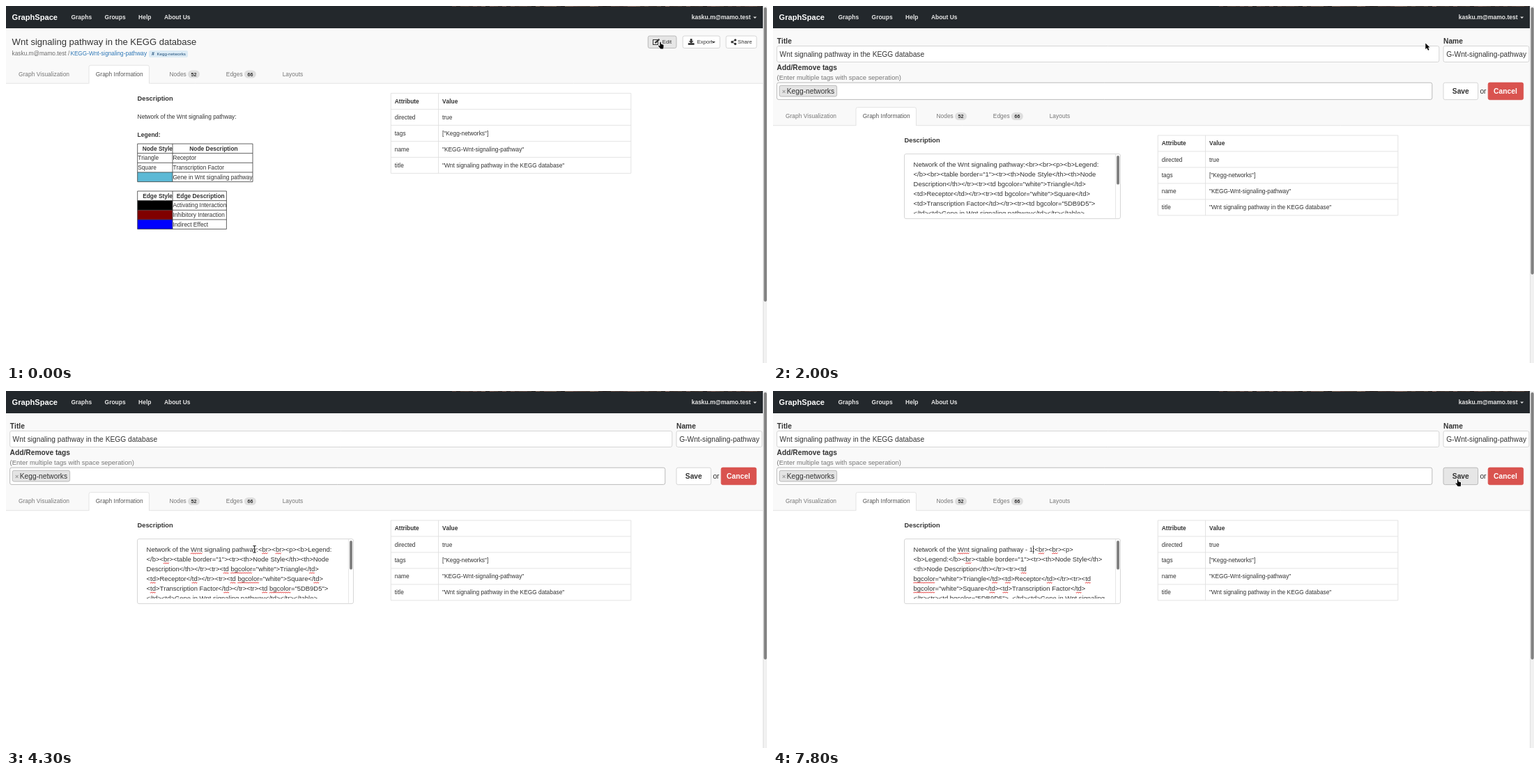
An HTML page with a canvas that plays this animation: 1092 px wide and 513 px high, repeating every 8000 ms.

```html
<!DOCTYPE html>
<html lang="en">
<head>
<meta charset="utf-8">
<title>Graph editor</title>
<style>
html, body { margin: 0; width: 100%; height: 100%; overflow: hidden; background: #fff; }
canvas { display: block; }
</style>
</head>
<body>
<canvas id="stage" width="1092" height="513"></canvas>
<script>
const ctx = document.getElementById('stage').getContext('2d');
const LOOP = 8000, STEP = 100;
const EDIT = 2000, FOCUS = 4300, TYPING = 5400, KEY = 200, TYPED = 6000, BLINK = 650;
const ZOOM = 8; // large font scaled down keeps letter advances exact
const SMALL = 8.38, AREA = 9.43, LARGE = 10.23;
const INK = '#333', GREY = '#777', LINE = '#ccc';

const USER = 'kasku.m@mamo.test';
const TITLE = 'Wnt signaling pathway in the KEGG database';
const HEAD = 'Network of the Wnt signaling pathway';
const SUFFIX = ' - 1';
const WRAP_SHORT = [
  ':<br><br><p><b>Legend:',
  '</b><br><table border="1"><tr><th>Node Style</th><th>Node',
  'Description</th></tr><tr><td bgcolor="white">Triangle</td>',
  '<td>Receptor</td></tr><tr><td bgcolor="white">Square</td>',
  '<td>Transcription Factor</td></tr><tr><td bgcolor="5DB9D5">',
  '</td><td>Gene in Wnt signaling pathway</td></tr></table>'
];
const WRAP_LONG = [
  ':<br><br><p>',
  '<b>Legend:</b><br><table border="1"><tr><th>Node Style</th>',
  '<th>Node Description</th></tr><tr><td',
  'bgcolor="white">Triangle</td><td>Receptor</td></tr><tr><td',
  'bgcolor="white">Square</td><td>Transcription Factor</td>',
  '</tr><tr><td bgcolor="5DB9D5">  </td><td>Gene in Wnt signaling'
];

// Pointer trips: each starts where the one before ended
const START = { x: 938.5, y: 51.8 };
const MOVES = [
  { from: 200, to: 600, x: 939.5, y: 66 },
  { from: 700, to: 1700, x: 936.3, y: 53.4 },
  { from: 2100, to: 2800, x: 467.5, y: 205 },
  { from: 2900, to: 3500, x: 308, y: 231 },
  { from: 3500, to: 4100, x: 356.6, y: 227.3 },
  { from: 6400, to: 6800, x: 757.5, y: 237 },
  { from: 7000, to: 7800, x: 982, y: 127.3 }
];

function setFont(size, bold) {
  ctx.font = `${bold ? 'bold ' : ''}${size * ZOOM}px "Liberation Sans", Arial, sans-serif`;
  ctx.fontKerning = 'none';
}

function widthOf(s, size, bold = false) {
  setFont(size, bold);
  return ctx.measureText(s).width / ZOOM;
}

// cy is the middle of the capitals
function text(s, x, cy, size = SMALL, color = INK, bold = false, align = 'left') {
  setFont(size, bold);
  ctx.textAlign = align;
  ctx.fillStyle = color;
  ctx.save();
  ctx.translate(x, cy + size * 0.344);
  ctx.scale(1 / ZOOM, 1 / ZOOM);
  ctx.fillText(s, 0, 0);
  ctx.restore();
}

function bold(s, x, cy, size = SMALL, color = INK, align = 'left') {
  text(s, x, cy, size, color, true, align);
}

function rect(x, y, w, h, color) {
  ctx.fillStyle = color;
  ctx.fillRect(x, y, w, h);
}

function box(x, y, w, h, fill, stroke, r = 2.4) {
  ctx.beginPath();
  ctx.roundRect(x, y, w, h, r);
  ctx.fillStyle = fill;
  ctx.fill();
  if (!stroke) return;
  ctx.strokeStyle = stroke;
  ctx.lineWidth = 0.8;
  ctx.stroke();
}

function line(x1, y1, x2, y2, color, width = 0.8) {
  ctx.beginPath();
  ctx.moveTo(x1, y1);
  ctx.lineTo(x2, y2);
  ctx.strokeStyle = color;
  ctx.lineWidth = width;
  ctx.stroke();
}

function downTriangle(x, y, w, color) {
  ctx.beginPath();
  ctx.moveTo(x, y);
  ctx.lineTo(x + w, y);
  ctx.lineTo(x + w / 2, y + w / 2);
  ctx.fillStyle = color;
  ctx.fill();
}

function grid(x, mid, right, top, rows, step, color) {
  for (const gx of [x, mid, right]) line(gx, top, gx, top + rows * step, color);
  for (let i = 0; i <= rows; i++) line(x, top + i * step, right, top + i * step, color);
}

function seeded(seed) {
  return () => (seed = seed * 16807 % 2147483647) / 2147483647;
}

function navBar() {
  rect(0, 0, 1086, 32, '#23282c');
  // sliver of a picture behind the window
  const rnd = seeded(11);
  for (let x = 640; x < 1080; x += 6) {
    rect(x, 0, 6, 1, `hsl(${10 + rnd() * 15} 18% ${15 + rnd() * 35}%)`);
  }
  bold('GraphSpace', 8.6, 16.6, 11.1, '#fff');
  let x = 93.5;
  for (const s of ['Graphs', 'Groups', 'Help', 'About Us']) {
    bold(s, x, 16.4, 8.45, '#e6e6e6');
    x += widthOf(s, 8.45, true) + 18.5;
  }
  bold(USER, 1068.5, 16.4, 8.5, '#e6e6e6', 'right');
  downTriangle(1072.2, 15.6, 5, '#e6e6e6');
}

function scrollBar(end) {
  rect(1086, 0, 6, 513, '#f1f1f1');
  rect(1086, 0, 0.7, 513, '#d8d8d8');
  box(1087.5, 2, 4.2, end - 2, '#808080', null, 2);
}

function tabs(base) {
  rect(0, 32, 1086, base - 32, '#f9f9f9');
  line(0, base, 1086, base, '#ddd');
  box(119, base - 26, 86.5, 30, '#fff', '#ddd');
  rect(118, base + 0.4, 89, 5, '#fff');
  const cy = base - 13.2;
  let x = 18;
  for (const s of ['Graph Visualization', 'Graph Information', 'Nodes 52', 'Edges 66', 'Layouts']) {
    const [label, count] = s.split(/ (?=\d)/);
    text(label, x, cy, 8.42, label.endsWith('Information') ? '#555' : GREY);
    x += widthOf(label, 8.42);
    if (count) {
      box(x + 2.2, cy - 5.6, 17, 11.2, '#dedede', null, 5.6);
      bold(count, x + 10.7, cy + 0.2, 7.1, INK, 'center');
      x += 19.2;
    }
    x += 37.8;
  }
}

function attributes(top) {
  const rows = { directed: 'true', tags: '["Kegg-networks"]',
    name: '"KEGG-Wnt-signaling-pathway"', title: `"${TITLE}"` };
  grid(552.3, 620.5, 896.8, top, 5, 23, '#ddd');
  bold('Attribute', 557.8, top + 11.4);
  bold('Value', 626, top + 11.4);
  Object.entries(rows).forEach(([key, value], i) => {
    const cy = top + 34.8 + i * 22.9;
    text(key, 557.8, cy, 8.35);
    text(value, 626, cy, 8.35);
  });
}

function legend(top, right, kind, rows) {
  const left = 188.7, mid = 239, step = 13.65;
  rows.forEach(([style, label], i) => {
    const y = top + step * (i + 1);
    if (style[0] === '#') rect(left, y, mid - left, step, style);
    else text(style, left + 0.5, y + step / 2, 8.25);
    text(label, mid + 0.4, y + step / 2, 8.28);
  });
  grid(left, mid, right, top, rows.length + 1, step, '#3a3a3a');
  bold(kind + ' Style', mid, top + 6.8, SMALL, INK, 'right');
  bold(kind + ' Description', (mid + right + 3) / 2, top + 6.8, SMALL, INK, 'center');
}

function editIcon(x, y) {
  ctx.strokeStyle = INK;
  ctx.lineWidth = 1;
  ctx.strokeRect(x - 4.5, y - 3.2, 7, 7);
  line(x - 1.5, y + 1.4, x + 4.5, y - 4, INK, 2.2);
}

function exportIcon(x, y) {
  rect(x - 1.4, y - 4.6, 2.8, 3.6, INK);
  downTriangle(x - 3.5, y - 1.4, 7, INK);
  rect(x - 4.4, y + 1.5, 8.8, 2.7, INK);
}

function shareIcon(x, y) {
  for (const [dx, dy] of [[2.3, -2.8], [-2.3, 0], [2.3, 2.8]]) {
    line(x - 2.3, y, x + dx, y + dy, INK, 1);
    ctx.beginPath();
    ctx.arc(x + dx, y + dy, 1.7, 0, 7);
    ctx.fillStyle = INK;
    ctx.fill();
  }
}

function button(x, y, w, h, hover) {
  box(x, y, w, h, hover ? '#e6e6e6' : '#fff', hover ? '#adadad' : LINE);
}

function toolButton(x, w, label, icon, hover) {
  button(x, 43, w, 17.5, hover);
  icon(x + 12 - (icon === shareIcon ? 1 : 0) - (icon === editIcon ? 0.3 : 0), 51.7);
  text(label, x + 20.5 - (icon === shareIcon ? 3.7 : 0), 51.8, 7.7);
}

function infoPage(hover) {
  tabs(111.2);
  text(TITLE, 8.6, 51.6, 13.05);
  text(USER + ' /', 8.6, 68.3, 8.3, '#6b6b6b');
  text('KEGG-Wnt-signaling-pathway', 92.4, 68.3, 8.22, '#2f78b7');
  box(205, 64, 56, 9.7, '#dcebf5', null, 2);
  bold('#', 208.9, 68.9, 7, '#1f4e79');
  text('Kegg-networks', 216.4, 68.9, 6.22, '#1f4e79');

  toolButton(921.3, 40.7, 'Edit', editIcon, hover);
  toolButton(971.2, 53.2, 'Export', exportIcon);
  toolButton(1033.2, 43.8, 'Share', shareIcon);
  downTriangle(1012.9, 51, 5, INK);

  bold('Description', 188.6, 132.7, 9.28);
  text(HEAD + ':', 188.6, 159.2, 8.35);
  bold('Legend:', 188.6, 185.2, 8.48);
  legend(198, 354, 'Node', [['Triangle', 'Receptor'], ['Square', 'Transcription Factor'],
    ['#5db9d5', 'Gene in Wnt signaling pathway']]);
  legend(266, 316.4, 'Edge', [['#000000', 'Activating Interaction'],
    ['#800000', 'Inhibitory Interaction'], ['#0000ff', 'Indirect Effect']]);
  attributes(125.4);
  scrollBar(424.8);
}

function wavy(x, w, y) {
  ctx.beginPath();
  for (let d = 0; d <= w; d += 0.5) ctx.lineTo(x + d, y + 0.7 * Math.sin(d * 2.2));
  ctx.strokeStyle = '#e01818';
  ctx.lineWidth = 0.9;
  ctx.stroke();
}

function textArea(t) {
  const left = 201.6;
  const keys = t < TYPING ? 0 : Math.floor((t - TYPING) / KEY) + 1;
  const start = HEAD + SUFFIX.slice(0, keys);
  const lines = [...(t < TYPED ? WRAP_SHORT : WRAP_LONG)];
  lines[0] = start + lines[0];

  box(188.5, 212.6, 310, 93, '#fff', LINE);
  line(491.6, 213.2, 491.6, 305.2, '#ddd');
  box(493.1, 215, 3.9, 41.6, '#808080', null, 2);

  ctx.save();
  ctx.beginPath();
  ctx.rect(189, 213, 302, 85.2);
  ctx.clip();
  lines.forEach((s, i) => {
    const cy = 227.9 + i * 14.05;
    text(s, left, cy, AREA);
    if (t < FOCUS) return;
    for (const m of s.matchAll(/\b(Wnt|br|td|bgcolor)\b/g)) {
      wavy(left + widthOf(s.slice(0, m.index), AREA), widthOf(m[0], AREA), cy + 5.4);
    }
  });
  ctx.restore();

  const since = t < TYPING ? t - FOCUS - STEP : Math.max(0, t - TYPED);
  const lit = since >= 0 && Math.floor(since / BLINK) % 2 === 0;
  if (lit) rect(left + widthOf(start, AREA), 222.3, 0.8, 11.4, '#111');
}

function editPage(t, hover) {
  tabs(171.7);
  bold('Title', 5.8, 50.2, LARGE);
  bold('Name', 962, 50.2, LARGE);
  box(5.6, 57.5, 950.2, 23, '#fff', LINE);
  box(962, 57.5, 122.8, 23, '#fff', LINE);
  text(TITLE, 9.6, 69.1, LARGE);
  text('G-Wnt-signaling-pathway', 1081, 69.1, LARGE, INK, false, 'right');
  bold('Add/Remove tags', 5.6, 88.5, LARGE);
  text('(Enter multiple tags with space seperation)', 5.6, 102.8, AREA, GREY);
  box(5.6, 110.2, 940.2, 24.2, '#fff', '#aaa');
  box(9.2, 114.2, 82.4, 15.8, '#e4e4e4', '#aaa');
  bold('×', 13.1, 122.6, 9, '#999');
  text('Kegg-networks', 19.8, 122.2, LARGE);
  button(962, 110.2, 49.6, 24.4, hover);
  bold('Save', 986.8, 122.4, 10.3, INK, 'center');
  text('or', 1014.4, 122, LARGE);
  box(1026.2, 110.1, 50.5, 24.6, '#d9534f', '#d9534f');
  bold('Cancel', 1051, 122.4, 10.3, '#fff', 'center');

  bold('Description', 188.6, 193.2, 9.28);
  textArea(t);
  attributes(185.9);
  scrollBar(385.8);
}

function outlined(path) {
  ctx.lineJoin = 'round';
  ctx.strokeStyle = '#fff';
  ctx.lineWidth = 1.2;
  ctx.stroke(path);
  ctx.fillStyle = '#000';
  ctx.fill(path);
}

const POINTERS = {
  arrow() {
    outlined(new Path2D('M0 0V8.6L2 6.8L3.7 10.4L5.2 9.7L3.6 6.2L6.2 6Z'));
  },
  hand() {
    outlined(new Path2D('M0 0H1.2L1.6 3L5 4V7L4.7 9.6H.7L-2.6 5.4L-2 4.8L-.2 6Z'));
  },
  beam() {
    for (const [color, width] of [['#fff', 1.4], ['#1a1a1a', 1]]) {
      line(0, -4.6, 0, 4.6, color, width);
      for (const y of [-4.7, 4.7]) line(-2.2, y, 2.2, y, color, width);
    }
  }
};

function easeOut(p) {
  return 1 - (1 - p) ** 2;
}

function pointerAt(t) {
  let { x, y } = START;
  for (const m of MOVES) {
    const p = easeOut(Math.min(1, Math.max(0, (t - m.from) / (m.to - m.from))));
    x += (m.x - x) * p;
    y += (m.y - y) * p;
  }
  return { x, y };
}

function inside(p, x, y, w, h) {
  return p.x >= x && p.x <= x + w && p.y >= y && p.y <= y + h;
}

function draw(now) {
  const t = Math.floor((now % LOOP) / STEP) * STEP; // the screen updates in steps
  const editing = t >= EDIT;
  const pos = pointerAt(t);
  const hover = editing ? inside(pos, 962, 110, 50, 25) : inside(pos, 921, 43, 41, 17.5);
  const overText = editing && inside(pos, 189, 213, 302, 92);

  rect(0, 0, 1092, 513, '#fff');
  if (editing) editPage(t, hover);
  else infoPage(hover);
  navBar();

  ctx.save();
  ctx.translate(pos.x, pos.y);
  POINTERS[hover ? 'hand' : overText ? 'beam' : 'arrow']();
  ctx.restore();
}

const start = performance.now();
function tick() {
  draw(performance.now() - start);
  requestAnimationFrame(tick);
}
tick();
</script>
</body>
</html>
```
